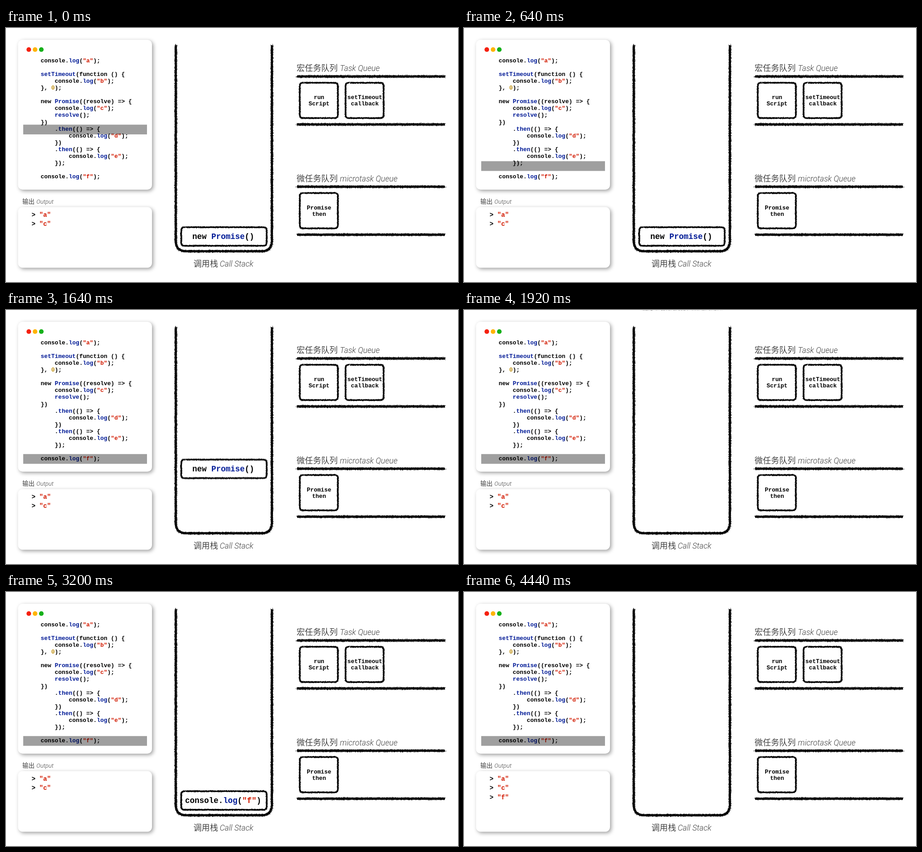
Recreate the animation shown at these times as an HTML page with a canvas. Size 997 by 561 pixels, loop 4.92 s.

```html
<!DOCTYPE html>
<html lang="zh">
<head>
<meta charset="utf-8">
<title>Event loop</title>
<style>
  html, body { margin: 0; width: 100%; height: 100%; overflow: hidden; background: #fff; }
  canvas { display: block; }
</style>
</head>
<body>
<canvas id="stage" width="997" height="561"></canvas>
<script>
const W = 997, H = 561, LOOP = 4920;
const BLACK = '#000', BLUE = '#001a96', RED = '#d21a00', GOLD = '#c2941a';
const MONO = '"Liberation Mono", monospace';
const CODE = `console.log("a");

setTimeout(function () {
    console.log("b");
}, 0);

new Promise((resolve) => {
    console.log("c");
    resolve();
})
    .then(() => {
        console.log("d");
    })
    .then(() => {
        console.log("e");
    });

console.log("f");`;

const stage = document.getElementById('stage').getContext('2d');

function layer(w, h, paint) {
  const canvas = document.createElement('canvas');
  canvas.width = w;
  canvas.height = h;
  paint(canvas.getContext('2d'));
  return canvas;
}

let seed = 7;
function random() {
  seed = (seed * 16807) % 2147483647;
  return seed / 2147483647;
}

// Charcoal stroke: a solid core with grains scattered around it
function charcoal(g, d, width) {
  const path = document.createElementNS('http://www.w3.org/2000/svg', 'path');
  path.setAttribute('d', d);
  g.lineWidth = width * 0.62;
  g.strokeStyle = g.fillStyle = BLACK;
  g.stroke(new Path2D(d));
  const length = path.getTotalLength();
  for (let s = 0; s < length; s += 0.25) {
    const p = path.getPointAtLength(s);
    const a = random() * 2 * Math.PI, r = width * (0.25 + 0.25 * random());
    g.fillRect(p.x + r * Math.cos(a) - 0.5, p.y + r * Math.sin(a) - 0.5, 1, 1);
  }
}

function roughBox(g, x, y, w, h) {
  const r = 7;
  charcoal(g, `M${x + r + 3} ${y}h${w - 2 * r - 3}q${r} 0 ${r} ${r}v${h - 2 * r}q0 ${r} ${-r} ${r}` +
    `h${2 * r - w}q${-r} 0 ${-r} ${-r}v${2 * r - h}q0 ${-r} ${r} ${-r}h1.5`, 4.4);
}

function text(g, str, x, y, font, color = BLACK, align = 'left') {
  g.font = font;
  g.fillStyle = color;
  g.textAlign = align;
  g.fillText(str, x, y);
}

function code(g, line, x, y, size) {
  const step = size * 0.6;
  for (const m of line.matchAll(/(\w+(?=\())|("\w")|(\b0\b)|\w+|[^\w\s"]/g)) {
    const color = m[1] ? BLUE : m[2] ? RED : m[3] ? GOLD : BLACK;
    text(g, m[0], x + m.index * step, y, `bold ${size}px ${MONO}`, color);
  }
}

function caption(g, cjk, latin, x, latinX, y, size) {
  text(g, cjk, x, y, `300 ${size}px "Noto Sans CJK SC", "Noto Sans CJK", sans-serif`, '#444');
  text(g, latin, latinX, y, `italic 300 ${size * 0.975}px Roboto, sans-serif`, '#444');
}

function card(g, x, y, w, h) {
  g.save();
  g.shadowColor = 'rgba(0,0,0,.38)';
  g.shadowBlur = 8;
  g.shadowOffsetX = g.shadowOffsetY = 3;
  g.fillStyle = '#fff';
  g.beginPath();
  g.roundRect(x, y, w, h, 10);
  g.fill();
  g.restore();
}

function task(g, x, y, lines) {
  roughBox(g, x, y, 84, 78);
  lines.forEach((line, i) =>
    text(g, line, x + 42.5, y + 36 + i * 14, `bold 12.8px ${MONO}`, BLACK, 'center'));
}

function queue(g, y, cjk, latin, latinX) {
  caption(g, cjk, latin, 641, latinX, y - 12, 18.1);
  charcoal(g, `M642 ${y}H968`, 7);
  charcoal(g, `M642 ${y + 106}H968`, 7);
}

const scene = layer(W, H, g => {
  g.fillStyle = '#fff';
  g.fillRect(0, 0, W, H);
  card(g, 26.5, 26, 295.5, 331);
  card(g, 26.5, 395.5, 295.5, 134);
  ['#f5200f', '#ffb400', '#15b01a'].forEach((color, i) => {
    g.fillStyle = color;
    g.beginPath();
    g.arc(50.3 + i * 13.8, 47.7, 5.1, 0, 2 * Math.PI);
    g.fill();
  });
  CODE.split('\n').forEach((line, i) => code(g, line, 76.5, 76 + i * 15.06, 12.9));
  caption(g, '输出', 'Output', 36, 67, 387.5, 13.5);
  code(g, '> "a"', 56.5, 416.5, 14.2);
  code(g, '> "c"', 56.5, 437.3, 14.2);

  charcoal(g, 'M374.5 38V470Q374.5 493 397 493H564Q586.5 493 586.5 470V38', 7);
  caption(g, '调用栈', 'Call Stack', 413.5, 471.5, 527, 18.1);

  queue(g, 107, '宏任务队列', 'Task Queue', 736.5);
  task(g, 648, 121, ['run', 'Script']);
  task(g, 749, 121, ['setTimeout', 'callback']);
  queue(g, 350.5, '微任务队列', 'microtask Queue', 736.5);
  task(g, 648, 364.5, ['Promise', 'then']);
});

const call = (label, x) => layer(200, 50, g => {
  roughBox(g, 6.5, 4, 188.5, 41);
  code(g, label, x, 29.5, 17.5);
});
const promiseCall = call('new Promise()', 31);
const logCall = call('console.log("f")', 15);

const progress = (t, start, span) => Math.min(1, Math.max(0, (t - start) / span));
const easeIn = p => 1 - Math.cos(p * Math.PI / 2);
const easeOut = p => Math.sin(p * Math.PI / 2);
const easeInOut = p => (1 - Math.cos(p * Math.PI)) / 2;

function draw(t) {
  stage.drawImage(scene, 0, 0);

  stage.fillStyle = 'rgba(0,0,0,.375)';
  stage.fillRect(38, 213 + 105.2 * easeInOut(progress(t, -42, 1000)), 273, 21.5);

  const rise = 486;
  const promiseLift = easeIn(progress(t, 1423, 500));
  const logLift = t < 3500 ? 1 - easeOut(progress(t, 2700, 500)) : easeIn(progress(t, 3929, 500));
  stage.drawImage(promiseCall, 380, 436 - rise * promiseLift);
  stage.drawImage(logCall, 380, 436 - rise * logLift);

  stage.globalAlpha = progress(t, 3290, 350);
  code(stage, '> "f"', 56.5, 458, 14.2);
  stage.globalAlpha = 1;
}

const began = performance.now();
function tick() {
  draw((performance.now() - began) % LOOP);
  requestAnimationFrame(tick);
}
tick();
</script>
</body>
</html>
```
